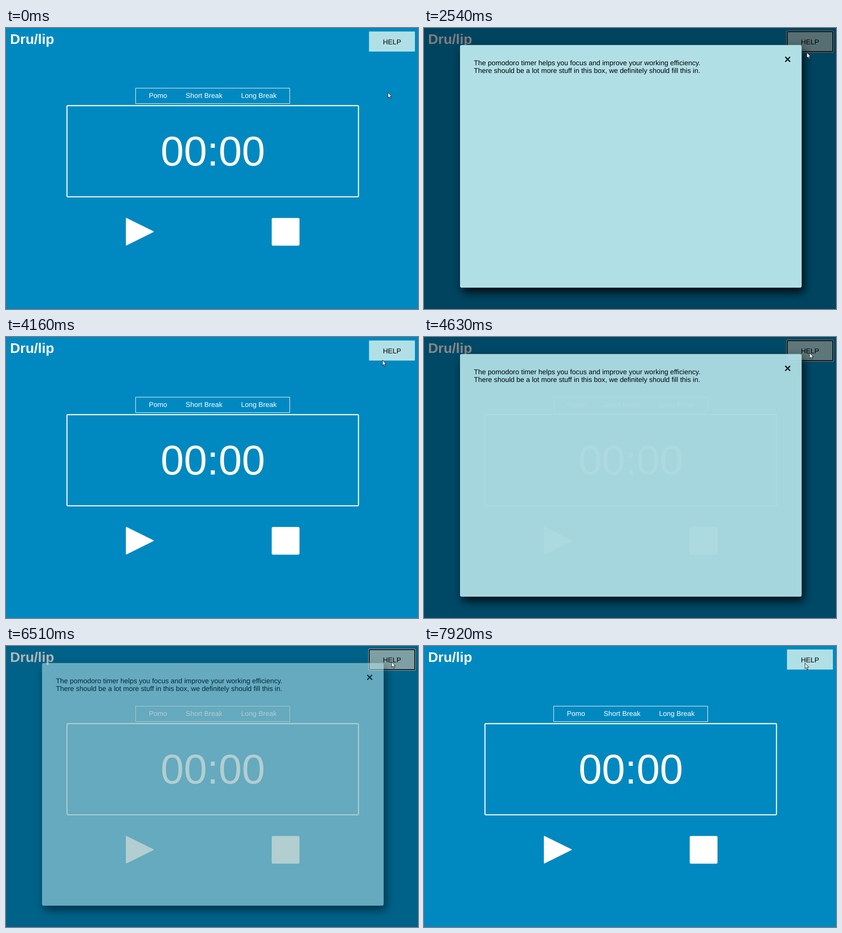
Write an HTML page that moves like this. It is 904 px wide and 619 px high and loops after 7.99 s.

```html
<!DOCTYPE html>
<html lang="en">
<head>
<meta charset="utf-8">
<title>Pomodoro timer</title>
<style>
  html, body { margin: 0; width: 100%; height: 100%; overflow: hidden; background: #0089c0; }
  svg { display: block; width: 904px; height: 619px; }
  text { font: 15.25px "Liberation Sans", Arial, sans-serif; text-rendering: geometricPrecision; }
  .mid { text-anchor: middle; }
  .title { font-size: 30.5px; font-weight: bold; }
  .clock { font-size: 91.5px; }
</style>
</head>
<body>
<svg viewBox="0 0 904 619">
  <defs>
    <filter id="shadow" x="-10%" y="-10%" width="120%" height="125%">
      <feDropShadow dx="5" dy="10" stdDeviation="10" flood-color="#000" flood-opacity=".85"/>
    </filter>
  </defs>
  <rect width="904" height="619" fill="#0089c0"/>

  <g fill="#fff">
    <text class="title" x="9" y="35">Dru/lip</text>
    <text class="mid" x="333.5" y="154">Pomo</text>
    <text class="mid" x="434.6" y="154">Short Break</text>
    <text class="mid" x="554.8" y="154">Long Break</text>
    <text class="mid clock" x="453.8" y="303">00:00</text>
    <path d="M264 419.300 L323.200 448.700 L264 478Z" stroke="#fff" stroke-width="2" stroke-linejoin="round"/>
    <rect x="583" y="418.500" width="61" height="61" rx="3"/>
  </g>
  <g fill="none" stroke="#fff">
    <rect x="284.500" y="132.500" width="338" height="34"/>
    <rect x="133.800" y="171" width="639.600" height="200.800" rx="2" stroke-width="2.300"/>
  </g>

  <g id="ring">
    <rect x="795" y="6" width="104" height="48" rx="3" fill="#fff"/>
    <rect x="796" y="7" width="102" height="46" rx="2" fill="#101010"/>
    <rect x="798" y="9" width="98" height="42" fill="#b0e0e6"/>
  </g>
  <rect id="button" x="796.500" y="7.700" width="100.700" height="44.200" fill="#b0e0e6"/>
  <text class="mid" x="846.900" y="35.500">HELP</text>

  <rect id="shade" width="904" height="619"/>
  <g id="panel">
    <rect x="79" y="37.500" width="749.500" height="534.500" rx="4" fill="#b0e0e6" filter="url(#shadow)"/>
    <text x="109.500" y="81.700">The pomodoro timer helps you focus and improve your working efficiency.</text>
    <text x="109.500" y="99.200">There should be a lot more stuff in this box, we definitely should fill this in.</text>
    <path d="M792.700 63.700 l10.600 10.600 m0 -10.600 l-10.600 10.600" stroke="#000" stroke-width="2.500"/>
  </g>

  <g id="cursor" fill="#fff" stroke="#000" stroke-linejoin="round">
    <path id="arrow" stroke-width=".9"
      d="M0 0 V12 L2.700 9.500 L4.700 14 L6.600 13.200 L4.700 8.900 H8.400Z"/>
    <g id="hand">
      <path d="M-1.500 1.500 Q0 -1 1.500 1.500 V6 Q3 5 4 6.600 Q5.500 5.900 6 7.500 Q7.600 7.300 7.600 9
               V12 Q7.400 14.500 5.900 15.600 V17.500 H-1.500 V15.800 L-5.300 10.500 Q-5.900 8.400 -4 8.500 L-1.500 10.800Z"/>
      <path d="M1.500 6 V9 M4 6.600 V9 M6 7.500 V9.500" stroke-width=".7"/>
    </g>
  </g>
</svg>
<script>
const LOOP = 7990, FADE = 245, PRESS = 80, HAND_REACH = 12;
const $ = id => document.getElementById(id);
const clamp = v => Math.min(1, Math.max(0, v));
const ease = p => p * p * (3 - 2 * p);
const show = (el, on) => el.setAttribute("visibility", on ? "visible" : "hidden");

const point = (x, y) => ({ x, y });
const REST = point(838, 142), HELP = point(837, 37), HELP_EDGE = point(846, 35);
const CLOSE = point(799, 72), ASIDE = point(865, 136);

// The pointer travels to each place in turn; sway bows its path.
const move = (start, end, to, sway = point(0, 0)) => ({ start, end, to, sway });
const moves = [
  move(1000, 1530, HELP, point(-17, 0)),
  move(2340, 3250, CLOSE, point(20, 34)),
  move(3950, 4330, HELP_EDGE),
  move(4800, 5110, ASIDE),
  move(5900, 6280, HELP_EDGE),
  move(6750, 7140, CLOSE),
  move(7690, 7940, HELP)
];

// The help box fades in after a press on the button and out after the next press.
const visit = (open, close) => ({ open, close });
const visits = [visit(1850, 3495), visit(4400, 5425), visit(6370, 7300)];

function pointerAt(t) {
  let { x, y } = REST;
  for (const { start, end, to, sway } of moves) {
    const p = ease(clamp((t - start) / (end - start)));
    const bow = Math.sin(Math.PI * p);
    x += (to.x - x) * p + sway.x * bow;
    y += (to.y - y) * p + sway.y * bow;
  }
  return point(Math.round(x), Math.round(y));
}

function opacityAt(t) {
  return Math.max(...visits.map(v =>
    clamp((t - v.open) / FADE) - clamp((t - v.close) / FADE)));
}

function draw(now) {
  const t = now % LOOP;
  const focused = visits.some(v => t >= v.open - PRESS && t < v.close);
  const { x, y } = pointerAt(t);
  const onClose = Math.hypot(x - CLOSE.x, y - CLOSE.y) < HAND_REACH;
  const opacity = opacityAt(t);

  show($("ring"), focused);
  show($("button"), !focused);
  $("shade").setAttribute("opacity", opacity / 2);
  $("panel").setAttribute("opacity", opacity);
  $("cursor").setAttribute("transform", `translate(${x} ${y})`);
  show($("arrow"), !onClose);
  show($("hand"), onClose);
}

let start;
function tick(now) {
  start ??= now;
  draw(Math.max(0, now - start));
  requestAnimationFrame(tick);
}
draw(0);
requestAnimationFrame(tick);
</script>
</body>
</html>
```
